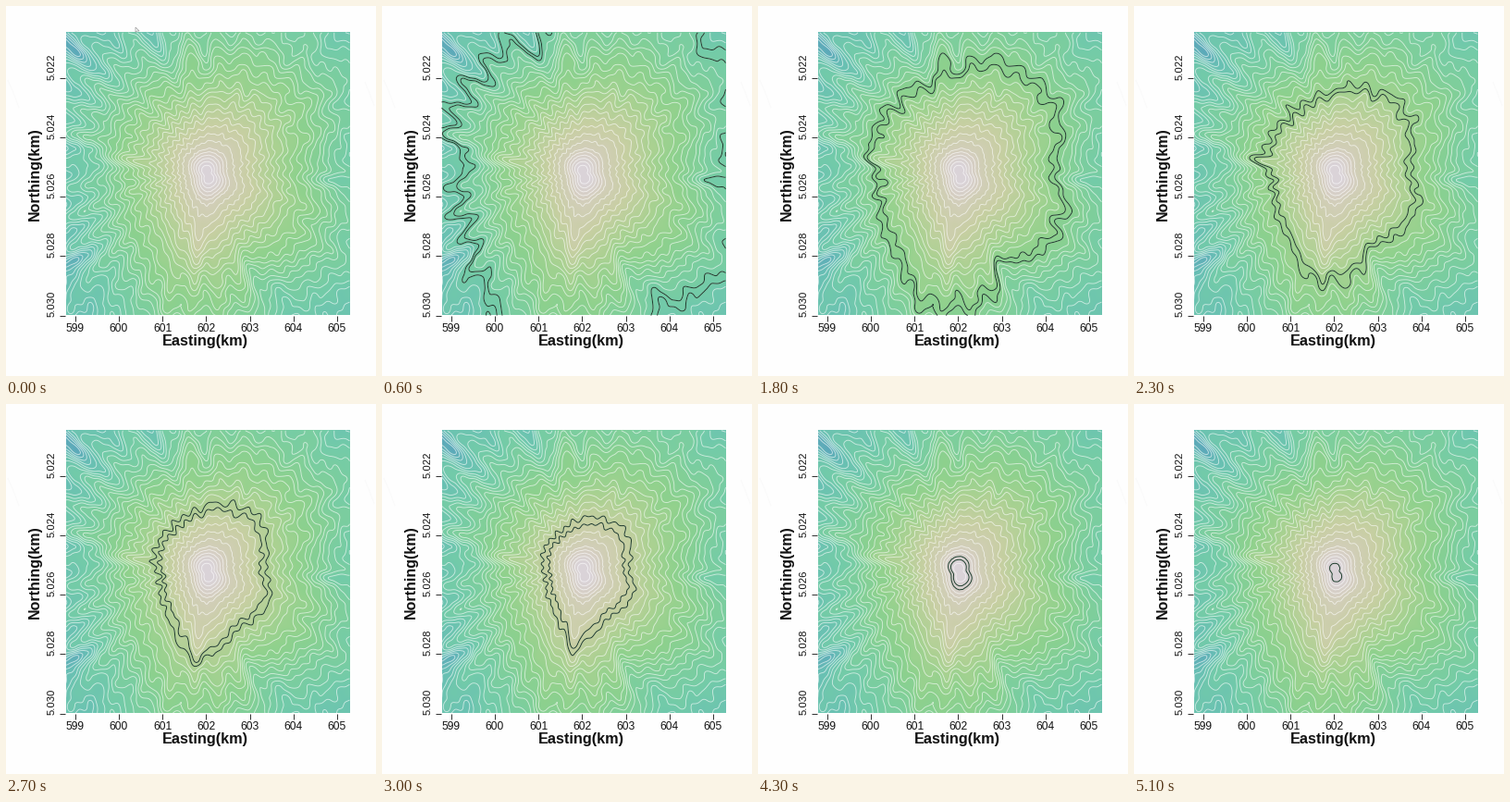
Animation, 400 px wide and 400 px high, one loop 5200 ms. Source, as a matplotlib script:

```python
import numpy as np
import matplotlib.pyplot as plt
from matplotlib.animation import FuncAnimation
from matplotlib.colors import LinearSegmentedColormap
from matplotlib.patches import PathPatch, Polygon

FRAMES, STEP = 52, 100
X0, X1, Y0, Y1 = 64.5, 371.5, 28.8, 334.5
PEAK = (218, 182)
LEVELS_PER_FRAME = 0.6
LOW, LAST = -7, 27

plt.rcParams["font.family"] = "Liberation Sans"

# Mean slope of the hill: distance from the peak and level reached there
DISTANCE = [0, 8, 25, 56, 92, 120, 148, 190, 240, 330]
HEIGHT = [27.6, 27, 22, 18, 13, 10, 6, 2, -1, -5]

# Relative reach of the hill every 30 degrees, clockwise from the right
REACH = [0.92, 1.06, 1.0, 1.27, 1.04, 0.83,
         0.77, 0.88, 0.9, 1.04, 1.13, 1.06]

# Spurs (up) and gullies (down): x, y, rise
FOLDS = [(350, 188, -3), (130, 165, 3.4), (100, 170, -2), (198, 46, 2.5),
         (217, 62, -3), (306, 60, -2.6), (182, 66, -2.4), (268, 292, -3.2),
         (295, 305, -2), (207, 262, 2.4), (72, 45, -3.5), (72, 275, -4),
         (162, 36, -3), (84, 140, 2)]


def px(size):
    return size * 0.72


def reach(angle):
    coef = np.fft.rfft(REACH) / len(REACH)
    coef[1:-1] *= 2
    return sum((c * np.exp(1j * k * angle)).real for k, c in enumerate(coef))


def fold(x, y, cx, cy, rise):
    """A bump stretched along the line to the peak."""
    ux, uy = np.array([cx - PEAK[0], cy - PEAK[1]]) / np.hypot(
        cx - PEAK[0], cy - PEAK[1])
    along = (x - cx) * ux + (y - cy) * uy
    across = (y - cy) * ux - (x - cx) * uy
    return rise * np.exp(-(along / 27) ** 2 - (across / 8) ** 2)


def flutes(angle, r, rng):
    """Random ridges that run down the hill and bend a little."""
    total = np.zeros_like(r)
    for n in rng.integers(9, 34, 9):
        phase, bend = rng.uniform(0, 2 * np.pi), rng.uniform(-1.2, 1.2)
        total += np.sin(n * angle + phase + bend * r / 30)
    return total / 2.1


def ripple(x, y, rng):
    """Small smooth unevenness from a few random waves."""
    total = np.zeros_like(x)
    for _ in range(14):
        a, phase = rng.uniform(0, 2 * np.pi, 2)
        k = 2 * np.pi / rng.uniform(9, 26)
        total += np.sin(k * (x * np.cos(a) + y * np.sin(a)) + phase)
    return total / np.sqrt(7)


def terrain(x, y):
    rng = np.random.default_rng(4)
    dx, dy = x - PEAK[0], y - PEAK[1]
    angle, r = np.arctan2(dy, dx), np.hypot(dx, dy)
    stretch = 1 + (reach(angle) - 1) * np.clip(r / 40, 0, 1)
    stretch += 0.6 * np.cos(2 * (angle - 1.3)) * np.exp(-r / 14)
    height = np.interp(r / stretch, DISTANCE, HEIGHT)
    height += 0.5 * np.clip((r - 8) / 110, 0, 1.3) * flutes(angle, r, rng)
    height += 0.2 * np.clip((r - 12) / 90, 0, 1) * ripple(x, y, rng)
    return height + sum(fold(x, y, *f) for f in FOLDS)


fig = plt.figure(figsize=(4, 4), dpi=100, facecolor="#fefefe")
ax = fig.add_axes([0, 0, 1, 1])
ax.axis("off")

gx, gy = np.meshgrid(np.linspace(X0, X1, 230), np.linspace(Y0, Y1, 230))
height = terrain(gx, gy)
tints = LinearSegmentedColormap.from_list(
    "hill", ["#5ca8ba", "#69c0b4", "#73cba9", "#80cf9a", "#8ed18d",
             "#abd192", "#c8cfa3", "#d5cec0", "#dad3d8"])
ax.imshow(height, extent=(X0, X1, Y1, Y0), cmap=tints, vmin=-5, vmax=27,
          aspect="auto", interpolation="bilinear")
levels = list(range(LOW, LAST + 2))
lines = ax.contour(gx, gy, height, levels=levels, colors="white",
                   linewidths=px(0.9), alpha=0.62, linestyles="solid")
outline = dict(zip(levels, lines.get_paths()))
ax.set_xlim(0, 400)
ax.set_ylim(400, 0)


def rule(xs, ys, color="#333333", width=1):
    ax.plot(xs, ys, color=color, lw=px(width), solid_capstyle="butt")


def label(x, y, text, size, **style):
    ax.text(x, y, text, fontsize=px(size), color="#111111",
            ha="center", va="center", **style)


for i in range(7):
    x = 74.5 + 47.25 * i
    rule([x, x], [335, 340.5])
    label(x, 349, str(599 + i), 12)
for i in range(5):
    y = 77.5 + 64.3 * i
    rule([58, 64], [y, y])
    label(50, 66 + 64 * i, f"5.0{22 + 2 * i}", 11.2, rotation=90)
label(215.5, 362, "Easting(km)", 16.2, weight="bold")
label(31, 182, "Northing(km)", 16, weight="bold", rotation=90)

rule([0, 400], [399.5, 399.5], "#c4c4c4")
rule([2, 8, 14], [80, 94, 110], "#fafafa")
rule([388, 393, 398], [82, 94, 108], "#fafafa")

pair = [ax.add_patch(PathPatch(outline[0], fill=False, lw=px(1),
                               ec="#1c3a2a", zorder=5)) for _ in range(2)]
pointer = ax.add_patch(Polygon([(140, 23), (140, 28.5), (141.5, 27),
                                (144, 27)], fc="white", ec="#999999",
                               lw=px(0.7), zorder=6))


def draw(frame):
    level = min(int(frame * LEVELS_PER_FRAME), LAST)
    for i, line in enumerate(pair):
        path = outline[level + i]
        line.set_path(path)
        line.set_visible(frame > 0 and len(path.vertices) > 0)
    pointer.set_visible(frame == 0)
    return [*pair, pointer]


anim = FuncAnimation(fig, draw, frames=FRAMES, interval=STEP, repeat=True,
                     repeat_delay=0, blit=False)
plt.show()
```
